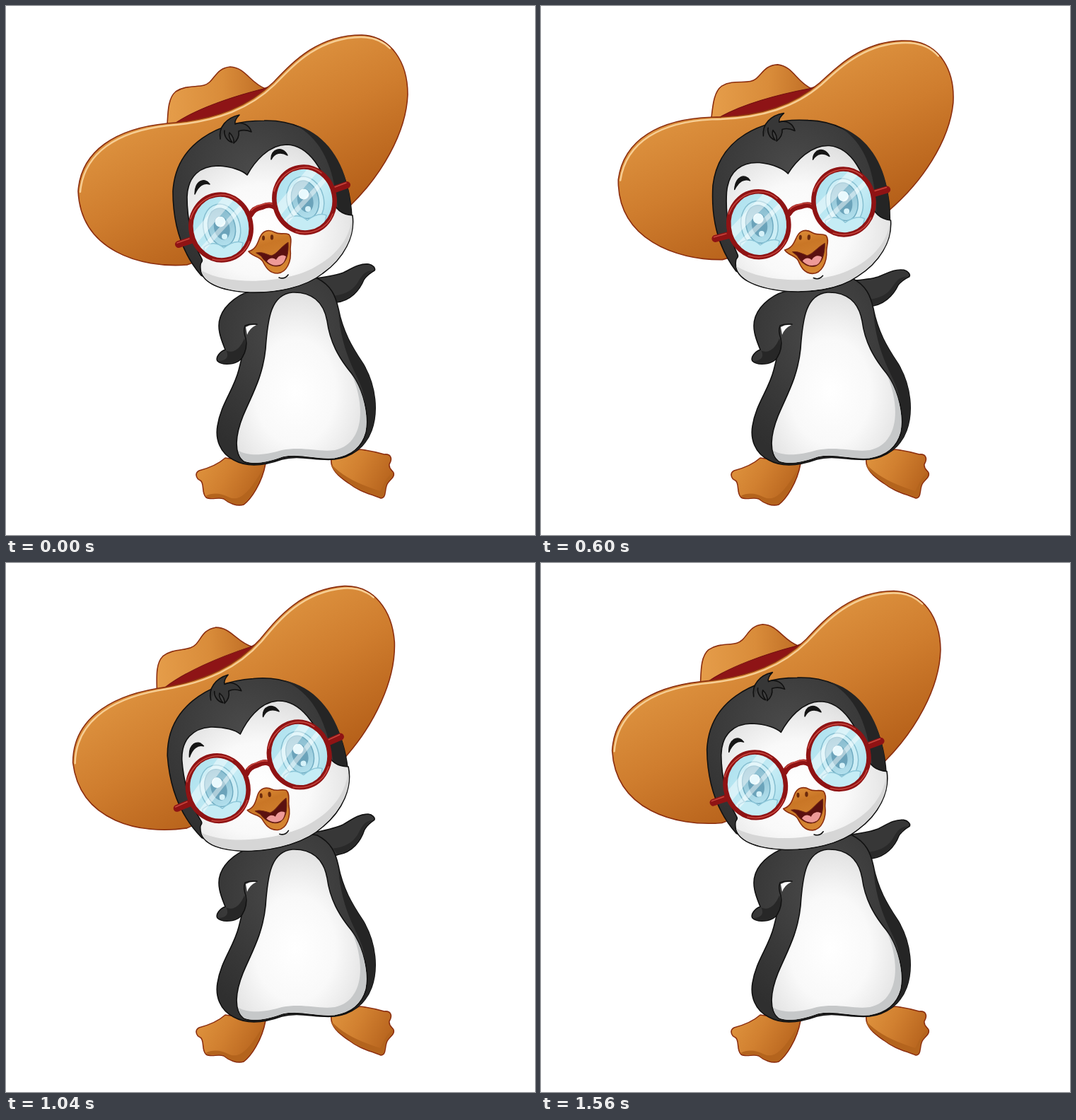
Animation of 748x748 px, one loop 1600 ms. Source, as an HTML page:

```html
<!DOCTYPE html>
<html lang="en">
<head>
<meta charset="utf-8">
<title>Swaying penguin</title>
<style>
html, body { margin: 0; height: 100%; overflow: hidden; background: #fff; }
svg { display: block; width: 100vw; height: 100vh; }
path { stroke-linejoin: round; stroke-linecap: round; }
.line { fill: none; }
.ink { stroke: #111; stroke-width: 1.6; }
.rust { stroke: #8c2f10; stroke-width: 1.6; }
.red { fill: none; stroke: #8f1314; }
.glow { fill: none; stroke: #c9483f; stroke-width: 1.5; }
</style>
</head>
<body>
<svg viewBox="0 0 748 748">
  <defs>
    <linearGradient id="brim" gradientUnits="userSpaceOnUse" x1="270" y1="100" x2="390" y2="350">
      <stop offset="0" stop-color="#e09642"/><stop offset=".45" stop-color="#cf7d2e"/><stop offset="1" stop-color="#b05a15"/>
    </linearGradient>
    <linearGradient id="crown">
      <stop offset="0" stop-color="#e59d4a"/><stop offset=".5" stop-color="#d98c3a"/><stop offset="1" stop-color="#b8651f"/>
    </linearGradient>
    <linearGradient id="foot" x2="1" y2=".4">
      <stop offset="0" stop-color="#e0953f"/><stop offset=".5" stop-color="#d18030"/><stop offset="1" stop-color="#b9661f"/>
    </linearGradient>
    <radialGradient id="fur" cx=".45" cy=".3" r=".7">
      <stop offset="0" stop-color="#4a4a4a"/><stop offset=".6" stop-color="#393939"/><stop offset="1" stop-color="#2f2f2f"/>
    </radialGradient>
    <radialGradient id="white" cx=".45" cy=".58" r=".62">
      <stop offset="0" stop-color="#fff"/><stop offset=".5" stop-color="#f9f9f9"/><stop offset="1" stop-color="#dedede"/>
    </radialGradient>
    <linearGradient id="glass" x2="1" y2="1">
      <stop offset="0" stop-color="#a9dfed"/><stop offset=".6" stop-color="#c5ecf5"/><stop offset="1" stop-color="#9fdaea"/>
    </linearGradient>
    <linearGradient id="iris" x2="0" y2="1">
      <stop offset="0" stop-color="#86b9cc"/><stop offset="1" stop-color="#b2e0ed"/>
    </linearGradient>
    <linearGradient id="beak" x2=".3" y2="1">
      <stop offset="0" stop-color="#e3933d"/><stop offset=".4" stop-color="#c97626"/><stop offset="1" stop-color="#d58532"/>
    </linearGradient>
    <clipPath id="lensClip"><ellipse rx="41" ry="45" transform="rotate(-10)"/></clipPath>
    <g id="lens">
      <ellipse rx="42" ry="46" transform="rotate(-10)" fill="url(#glass)"/>
      <g clip-path="url(#lensClip)">
        <g transform="rotate(-14)">
          <ellipse cx="1" cy="1" rx="26" ry="34" fill="#cdeef6" stroke="#86bfd1" stroke-width="1.5"/>
          <ellipse cx="1" cy="0" rx="19" ry="27" fill="url(#iris)" stroke="#6fabc1" stroke-width="1.5"/>
          <ellipse cx="1" cy="1" rx="11" ry="17" fill="#6ba3ba"/>
        </g>
        <path d="M-24 28Q-10 17 4 29Q20 17 31 22L26 46H-24Z" fill="#c5ecf5" stroke="#8cc6d8" stroke-width="1.5"/>
        <circle cx="-1" cy="-8" r="7.5" fill="#e9f9fd"/>
        <circle cx="5" cy="13" r="4" fill="#d6f2f9"/>
        <path d="M-43 12L7-47H25L-38 27ZM-32 32L33-38L38-34L-27 37Z" fill="#fff" opacity=".45"/>
      </g>
      <ellipse rx="42.5" ry="46.5" transform="rotate(-10)" class="red" stroke-width="6.5"/>
      <path d="M-43-12C-35-40 0-57 24-38M-12 45C8 50 32 42 40 20" class="glow"/>
    </g>
  </defs>

  <g class="sway">
    <path class="ink" fill="#373737" d="M405 390C435 384 460 384 477 377C491 370 500 364 513 365C519 366 523 371 521 374C514 378 510 381 506 387C500 402 487 417 467 419C448 424 420 420 405 410Z"/>
    <path fill="#292929" d="M518 374C505 375 502 384 496 393C488 404 476 409 460 410L465 418C486 416 500 402 505 387C509 380 513 378 518 374Z"/>
  </g>

  <path class="rust" fill="url(#foot)" d="M310 639C300 648 288 653 273 657C267 660 268 668 275 671C281 675 276 689 283 695C290 699 300 694 308 697C315 703 327 708 336 705C346 698 362 675 367 647Z"/>
  <path fill="#b4641d" d="M282 693C294 687 305 690 314 694C326 700 339 697 363 655C358 676 347 695 336 704C326 707 315 702 308 696C300 693 290 698 282 693Z"/>
  <path class="rust" fill="url(#foot)" d="M460 641C458 654 470 665 485 675C500 687 516 690 530 696C538 696 535 684 539 676C542 670 550 667 548 660C546 656 541 655 542 648C547 640 544 633 535 634C521 630 510 628 500 627Z"/>
  <path fill="#b4641d" d="M460 648C478 668 507 679 529 686C534 680 533 672 547 659C548 667 541 670 538 676C535 684 537 695 530 695C516 689 500 686 485 674C470 664 461 656 460 648Z"/>

  <path class="ink" fill="url(#fur)" d="M351 403C370 396 420 380 440 385C460 395 466 410 470 428C476 460 489 482 505 506C524 538 526 575 517 600C508 625 487 638 465 641C440 644 415 634 390 641C365 650 340 652 322 642C302 632 296 612 299 594C304 562 322 543 329 515L334 495C332 500 330 502 327 503C319 507 305 508 299 502C296 497 302 489 310 486C306 475 297 457 303 440C309 422 332 404 351 403Z"/>
  <path fill="#252525" d="M470 430C476 460 489 482 505 506C524 538 526 575 517 600C511 616 502 625 492 631C512 600 514 560 498 528C484 500 472 470 470 430Z"/>
  <path class="ink" fill="url(#white)" d="M405 405C432 404 449 418 454 445C458 475 470 497 489 520C506 545 514 580 509 603C503 625 488 636 465 640C440 643 418 633 392 638C370 646 350 650 336 644C321 632 325 605 335 580C347 551 363 525 367 485C370 440 375 408 405 405Z"/>
  <path fill="#c6c8c9" d="M489 521C506 545 513 580 508 603C502 624 488 635 465 639C440 642 418 632 392 637C370 645 350 649 337 643C331 639 329 634 329 629C345 638 370 634 390 628C420 622 440 631 465 628C504 620 510 570 489 521Z"/>
  <path fill="#272727" d="M311 487C320 492 331 486 337 470C342 485 337 497 327 502C318 506 305 507 300 502C312 502 316 495 311 487Z"/>
  <path fill="#fff" d="M339 454Q346 450 354 451Q344 456 341 465Z"/>
  <path class="line ink" d="M355 450Q345 449 338 452Q335 459 339 470Q342 484 334 497"/>

  <g class="sway">
    <path class="rust" fill="url(#crown)" d="M228 168C229 150 229 130 240 121C253 112 269 115 280 112C295 108 295 88 317 86C339 87 345 109 367 117L385 130L250 190Z"/>
    <path fill="#8e1416" stroke="#70100f" d="M240 165C270 145 320 128 364 117L385 108L350 150L245 175Z"/>
    <path class="rust" fill="url(#brim)" d="M102 262C106 205 155 173 228 166C300 161 345 140 378 108C405 80 440 41 503 41C545 43 568 80 568 125C566 180 530 240 487 282L256 366C190 371 106 346 102 262Z"/>
    <path class="line" stroke="#f7cf95" stroke-width="2.4" d="M105 263C110 208 157 177 229 169C301 164 347 143 380 111C407 83 442 45 502 44C520 44 533 50 543 60"/>

    <path class="ink" fill="url(#fur)" d="M276 381C245 345 236 300 236 262C240 195 300 162 365 162C440 160 486 220 489 300L470 350L300 392Z"/>
    <path fill="#252525" d="M409 168C458 182 488 232 488 300L470 294C465 240 454 193 409 168Z"/>
    <path class="ink" fill="url(#white)" d="M341 239C351 221 371 196 397 196C430 197 450 235 460 270C465 288 475 295 490 296C494 325 478 357 448 378C422 399 380 406 345 405C305 403 272 392 275 366C275 362 279 362 277 358C262 330 256 300 256 270C257 240 275 226 300 226C320 227 335 233 341 239Z"/>
    <path fill="#d6d6d6" d="M276 374C279 392 310 403 345 404C380 405 421 398 447 377C477 356 493 325 489 303C484 332 465 354 437 369C402 390 320 398 276 374Z"/>

    <path class="ink" fill="#373737" d="M303 188C300 171 312 158 330 154C325 159 323 163 324 167C334 163 344 168 347 178C340 175 334 175 329 177C330 184 327 190 322 194C323 187 320 183 316 179C314 184 317 189 320 193C310 190 308 180 309 176"/>
    <path d="M267 266C267 248 280 241 288 252C280 249 272 254 267 266ZM375 217C374 202 391 197 398 211C389 206 380 207 375 217Z" fill="#151515" stroke="#151515" stroke-width="1.5"/>

    <path class="red" stroke-width="10" d="M244 337L262 331M465 259L482 253"/>
    <path class="glow" d="M242 335L259 329M465 256L481 250"/>
    <path class="red" stroke-width="8" d="M346 295Q350 286 362 284Q373 279 380 284"/>
    <path class="glow" d="M347 289Q352 283 362 281Q372 277 379 281"/>
    <use href="#lens" x="304" y="313"/>
    <use href="#lens" x="422" y="274"/>

    <path class="rust" fill="url(#beak)" d="M343 347C354 344 356 334 359 327C363 318 371 315 380 320C387 324 393 320 400 323C405 328 402 337 402 344C404 361 397 377 384 378C372 378 367 369 363 361C358 353 349 355 343 347Z"/>
    <path fill="#5b1110" stroke="#6f2410" d="M354 349C362 347 368 351 375 353C383 351 388 341 399 334C400 350 397 362 388 367C376 371 366 362 361 354Z"/>
    <path fill="#ee9a98" d="M369 361C373 355 379 356 382 359C385 352 392 351 396 354C394 362 391 365 387 366C380 368 374 366 369 361Z"/>
    <g fill="#6b2a0c"><ellipse cx="364" cy="328" rx="2" ry="3.5"/><ellipse cx="376" cy="327" rx="2.2" ry="3.8"/></g>
    <path class="line ink" d="M386 384Q394 387 399 380"/>
  </g>
</svg>
<script>
const LOOP = 1600, STEP = 40, SWING = 7;
const parts = document.querySelectorAll('.sway');

// Triangle wave: 0, +1, 0, -1 at each quarter of the loop.
const triangle = p => 1 - 4 * Math.abs((p + 0.25) % 1 - 0.5);

function draw(now) {
  const time = Math.floor(now % LOOP / STEP) * STEP;
  const angle = SWING * triangle(time / LOOP);
  for (const part of parts) part.setAttribute('transform', `rotate(${angle} 377 373)`);
}

const start = performance.now();
function tick() {
  draw(performance.now() - start);
  requestAnimationFrame(tick);
}
tick();
</script>
</body>
</html>
```
